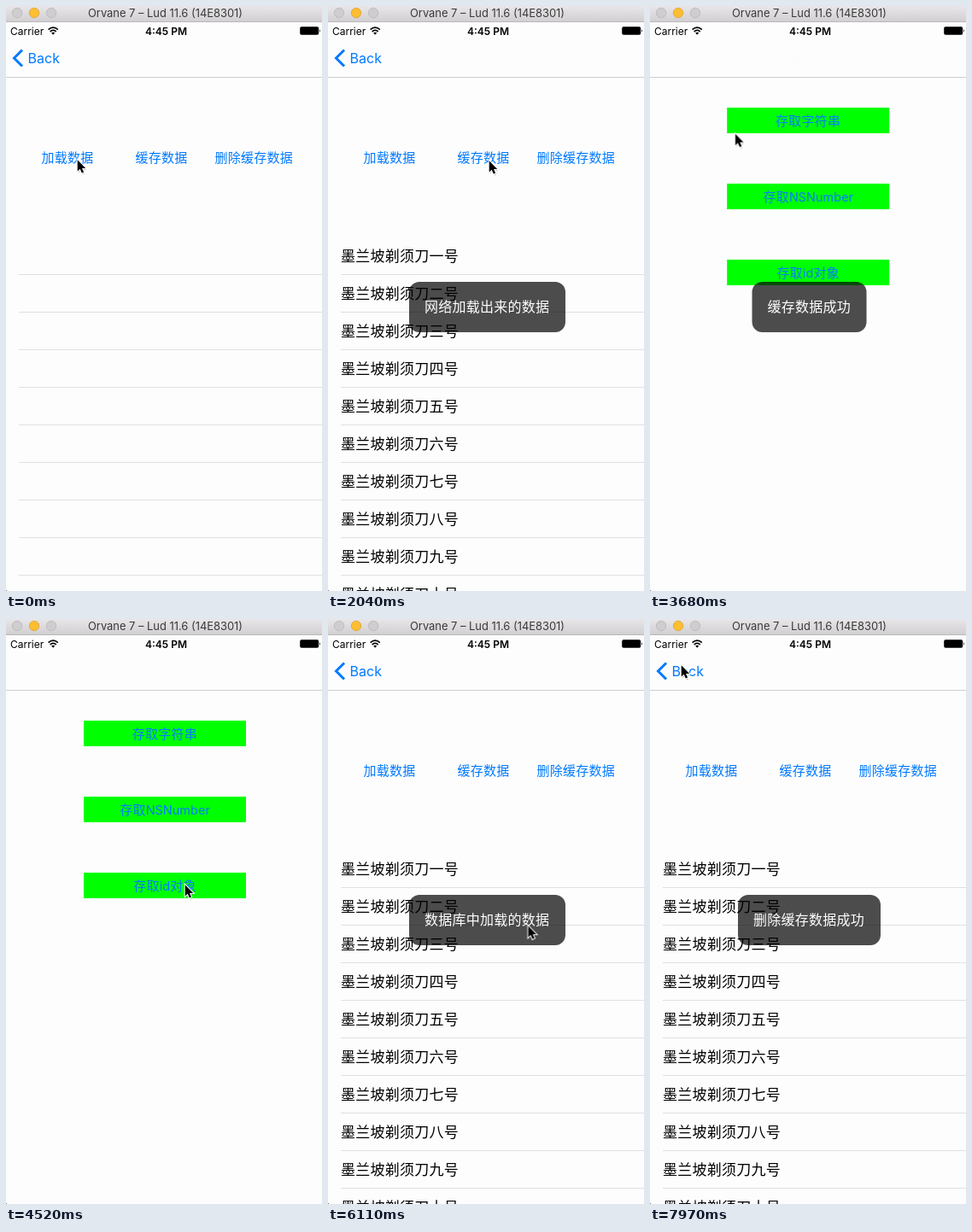
Write an HTML page that moves like this. It is 370x685 px and loops after 8000 ms.

```html
<!DOCTYPE html>
<html lang="zh-CN">
<head>
<meta charset="utf-8">
<title>缓存数据</title>
<style>
html, body { margin: 0; width: 100%; height: 100%; overflow: hidden; background: #fdfdfd; }
svg { display: block; width: 100vw; height: 100vh; }
text { font-family: Inter, "Noto Sans CJK SC", "Noto Sans CJK", sans-serif; white-space: pre; }
.zh { font-family: "Noto Sans CJK SC", "Noto Sans CJK", sans-serif; letter-spacing: .25px; }
.blue { fill: #007aff; font-size: 15px; }
.latin { font-family: Inter, sans-serif; font-size: 14.5px; letter-spacing: 0; }
.row { font-size: 17px; }
.tip { font-size: 16px; fill: #fff; }

.anim { animation: 8s linear infinite; }
#rows { animation-name: rows; animation-timing-function: step-end; }
#list { animation-name: list; }
#home { animation-name: home; }
#dim { animation-name: dim; }
#arrow { animation-name: arrow; }
#label { animation-name: label; }
#t1 { animation-name: t1; }
#t2 { animation-name: t2; }
#t3 { animation-name: t3; }
#t4 { animation-name: t4; }
#cursor { animation-name: cursor; animation-timing-function: ease-in-out; }
#list, #home, #dim, #label { animation-timing-function: cubic-bezier(.36, .66, .04, 1); }

@keyframes rows { 0% { opacity: 0; } 4.5%, 100% { opacity: 1; } }

/* page transitions */
@keyframes list {
  0%, 41.125% { transform: translateX(0); }
  47.375%, 59.875% { transform: translateX(370px); }
  65.9%, 100% { transform: translateX(0); }
}
@keyframes home {
  0%, 41.125% { transform: translateX(-111px); }
  47.375%, 59.875% { transform: translateX(0); }
  65.9%, 100% { transform: translateX(-111px); }
}
@keyframes dim {
  0%, 41.125% { opacity: .1; }
  47.375%, 59.875% { opacity: 0; }
  65.9%, 100% { opacity: .1; }
}
@keyframes arrow {
  0%, 39.49% { opacity: 1; }
  39.5%, 41.125% { opacity: .28; }
  43.5%, 59.875% { opacity: 0; }
  63.5%, 100% { opacity: 1; }
}
@keyframes label {
  0%, 39.49% { opacity: 1; transform: translateX(0); }
  39.5%, 40.86% { opacity: .3; transform: translateX(0); }
  40.87%, 41.125% { opacity: 1; transform: translateX(0); }
  47.375%, 59.875% { opacity: 0; transform: translateX(130px); }
  65.9%, 100% { opacity: 1; transform: translateX(0); }
}

/* messages */
@keyframes t1 { 0%, 4.4% { opacity: 0; } 6.25%, 26.2% { opacity: 1; } 27.7%, 100% { opacity: 0; } }
@keyframes t2 { 0%, 29.8% { opacity: 0; } 31.6%, 51.2% { opacity: 1; } 52.75%, 100% { opacity: 0; } }
@keyframes t3 { 0%, 59.9% { opacity: 0; } 61.9%, 81.2% { opacity: 1; } 83%, 100% { opacity: 0; } }
@keyframes t4 { 0%, 94.8% { opacity: 0; } 96.6%, 100% { opacity: 1; } }

@keyframes cursor {
  0%, 1.875% { transform: translate(83px, 180px); }
  2.625%, 10.25% { transform: translate(81px, 179px); }
  12.75%, 16.5% { transform: translate(173px, 196px); }
  19% { transform: translate(182px, 186px); }
  22.5%, 32% { transform: translate(188px, 181px); }
  38.5%, 42.5% { transform: translate(40px, 54px); }
  50.6%, 55% { transform: translate(193px, 301px); }
  56.45%, 70.6% { transform: translate(209px, 311px); }
  75% { transform: translate(228px, 355px); }
  80.5%, 81% { transform: translate(271px, 387px); }
  84% { transform: translate(300px, 335px); animation-timing-function: linear; }
  87.375% { transform: translate(304px, 241px); animation-timing-function: ease-out; }
  90.375%, 91.125% { transform: translate(299px, 199px); }
  92.6%, 95.5% { transform: translate(291px, 182px); }
  99.5%, 100% { transform: translate(36px, 54px); }
}
</style>
</head>
<body>
<svg viewBox="0 0 370 685">
  <defs>
    <linearGradient id="bar" x2="0" y2="1">
      <stop offset="0" stop-color="#e8e6e8"/>
      <stop offset="1" stop-color="#d0ced0"/>
    </linearGradient>
    <clipPath id="body"><rect y="84" width="370" height="601"/></clipPath>
  </defs>
  <rect width="370" height="685" fill="#fdfdfd"/>

  <g clip-path="url(#body)">
    <g id="home" class="anim">
      <g fill="#0f0">
        <rect x="91" y="119" width="190" height="30"/>
        <rect x="91" y="208" width="190" height="30"/>
        <rect x="91" y="297" width="190" height="30"/>
      </g>
      <g class="blue" text-anchor="middle">
        <text class="zh" x="186" y="139.5">存取字符串</text>
        <text class="zh" x="186" y="228.5">存取<tspan class="latin">NSNumber</tspan></text>
        <text class="zh" x="186" y="317.5">存取<tspan class="latin">id</tspan>对象</text>
      </g>
    </g>
    <rect id="dim" class="anim" y="84" width="370" height="601"/>
    <g id="list" class="anim">
      <rect y="84" width="370" height="601" fill="#fdfdfd"/>
      <g class="blue">
        <text class="zh" x="41.5" y="182.7">加载数据</text>
        <text class="zh" x="151.5" y="182.7">缓存数据</text>
        <text class="zh" x="244.5" y="182.7">删除缓存数据</text>
      </g>
      <g id="lines" fill="#e0e0e2"></g>
      <g id="rows" class="anim"></g>
    </g>
  </g>

  <rect y="83" width="370" height="1" fill="#cfcfd1"/>
  <path id="arrow" class="anim" d="M19 51.5L9.5 61L19 70.5" fill="none" stroke="#007aff" stroke-width="3"/>
  <text id="label" class="anim" x="25.6" y="67" font-size="16" fill="#007aff">Back</text>

  <text x="5" y="33.5" font-size="12">Carrier</text>
  <g fill="none" stroke="#000" stroke-width="1.7">
    <path d="M49.6 27.6Q55.2 22.6 60.8 27.6"/>
    <path d="M51.7 30Q55.2 26.9 58.7 30"/>
  </g>
  <path d="M53.2 31.6Q55.2 30 57.2 31.6L55.2 33.8Z"/>
  <text x="187.5" y="33.5" font-size="12" font-weight="600" text-anchor="middle">4:45 PM</text>
  <rect x="344.2" y="24.2" width="22" height="9.6" rx="1.8"/>
  <path d="M367 27.2Q368.8 29 367 30.8Z"/>

  <rect width="370" height="19" fill="url(#bar)"/>
  <rect y="18" width="370" height="1" fill="#bab8ba"/>
  <g fill="#cfcdcf" stroke="#b8b6b8" stroke-width=".8">
    <circle cx="13" cy="8" r="5.7"/>
    <circle cx="33" cy="8" r="5.7" fill="#fdbe30" stroke="#e0a135"/>
    <circle cx="53" cy="8" r="5.7"/>
  </g>
  <text x="186.5" y="13" font-size="12.9" fill="#3a3a3a" text-anchor="middle">Orvane 7 – Lud 11.6 (14E8301)</text>
  <rect y="684" width="1" height="1" fill="#777"/>

  <g id="toasts"></g>

  <g id="cursor" class="anim">
    <g transform="translate(.7 .2)">
      <path d="M1 2V15.4L4 12.6L6 17.2L8.4 16.2L6.4 11.7H10.4Z" opacity=".22"/>
      <path d="M0 0V13.4L3 10.6L5.1 15.4L7.4 14.4L5.3 9.8H9.5Z" stroke="#fff" stroke-width="2" paint-order="stroke"/>
    </g>
  </g>
</svg>
<script>
const put = (id, html) => { document.getElementById(id).innerHTML = html; };
const ROW = 44;

put('rows', [...'一二三四五六七八九十'].map((n, i) =>
  `<text class="zh row" x="15" y="${299 + i * ROW}">墨兰坡剃须刀${n}号</text>`).join(''));

put('lines', Array.from({ length: 9 }, (_, i) =>
  `<rect x="15" y="${314 + i * ROW}" width="355" height="1"/>`).join(''));

const toast = (id, x, w, msg) => `<g id="${id}" class="anim">
  <rect x="${x}" y="323" width="${w}" height="59" rx="12" fill-opacity=".7"/>
  <text class="zh tip" x="${x + 18}" y="358">${msg}</text></g>`;

put('toasts',
  toast('t1', 95, 183, '网络加载出来的数据') +
  toast('t2', 119.5, 134, '缓存数据成功') +
  toast('t3', 95, 183, '数据库中加载的数据') +
  toast('t4', 103, 167, '删除缓存数据成功'));
</script>
</body>
</html>
```
